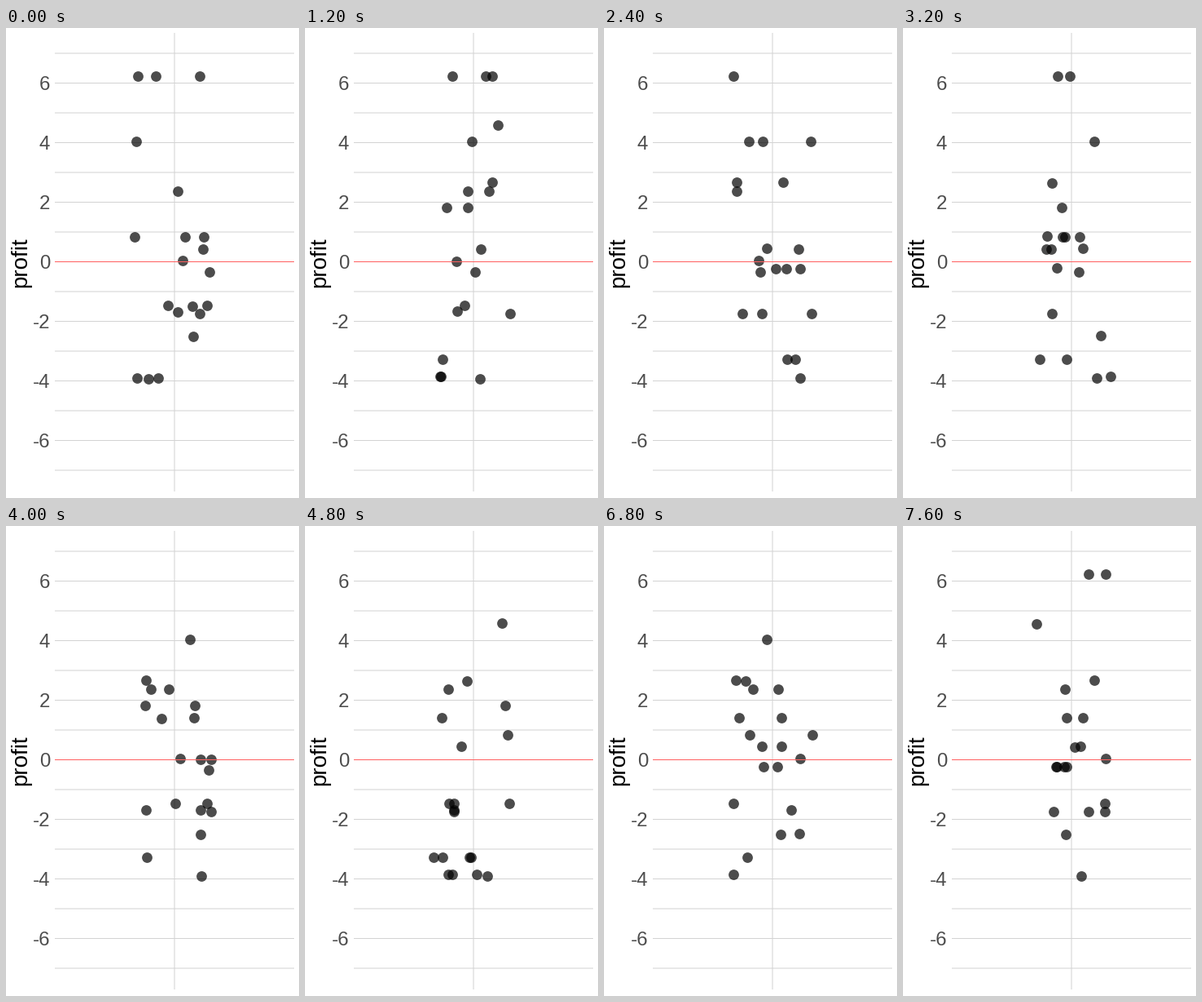
Write a matplotlib script that moves like this. It is 360 by 576 pixels and loops after 8000 ms.

```python
import matplotlib.pyplot as plt
import numpy as np
from matplotlib.animation import FuncAnimation

W, H, DPI = 360, 576, 100
DRAWS, COUNT = 20, 20       # draws in a loop, dots in each draw
ZERO, UNIT = 286.5, 36.5    # pixel row of zero profit, pixels per unit
LEFT, RIGHT = 158, 256      # sideways jitter
PROFITS = [6.23, 4.58, 4.04, 2.66, 2.37, 1.82, 1.4, 0.84, 0.44, 0.03,
           -0.22, -0.34, -1.47, -1.67, -1.74, -2.5, -3.27, -3.85, -3.91]


def pt(px):
    return px * 72 / DPI


def row(profit):
    return ZERO - profit * UNIT


def resample(index):
    """One bootstrap draw: profits with replacement, jittered sideways."""
    rng = np.random.default_rng(index)
    x = rng.uniform(LEFT, RIGHT, COUNT)
    y = row(rng.choice(PROFITS, COUNT)) + rng.uniform(-0.5, 0.5, COUNT)
    return np.column_stack([x, y])


fig = plt.figure(figsize=(W / DPI, H / DPI), dpi=DPI, facecolor="white")
ax = fig.add_axes([0, 0, 1, 1])
ax.set_xlim(0, W)
ax.set_ylim(H, 0)
ax.axis("off")


def rule(xs, ys, color="#d3d3d3", z=1):
    ax.plot(xs, ys, color=color, lw=pt(1), zorder=z,
            solid_capstyle="butt", snap=False)


rule([207, 207], [6, 568])
for value in range(-7, 8):
    y = row(value)
    if value:
        rule([60, 354], [y, y])
    if value % 2 == 0:
        ax.text(54.3, y + 8.7, str(value), ha="right", va="baseline",
                family="Liberation Sans", size=pt(24), color="#4d4d4d")
rule([60, 354], [ZERO, ZERO], color="#ff6060", z=4)
ax.text(25.2, 287, "profit", rotation=90, rotation_mode="anchor",
        ha="center", va="baseline", family="Liberation Sans",
        size=pt(27.7), color="black")

dots = ax.scatter([], [], s=pt(12.8) ** 2, color="black", alpha=0.7,
                  linewidths=0, zorder=3)


def update(index):
    dots.set_offsets(resample(index))
    return (dots,)


anim = FuncAnimation(fig, update, frames=DRAWS, interval=400, repeat=True)
plt.show()
```
